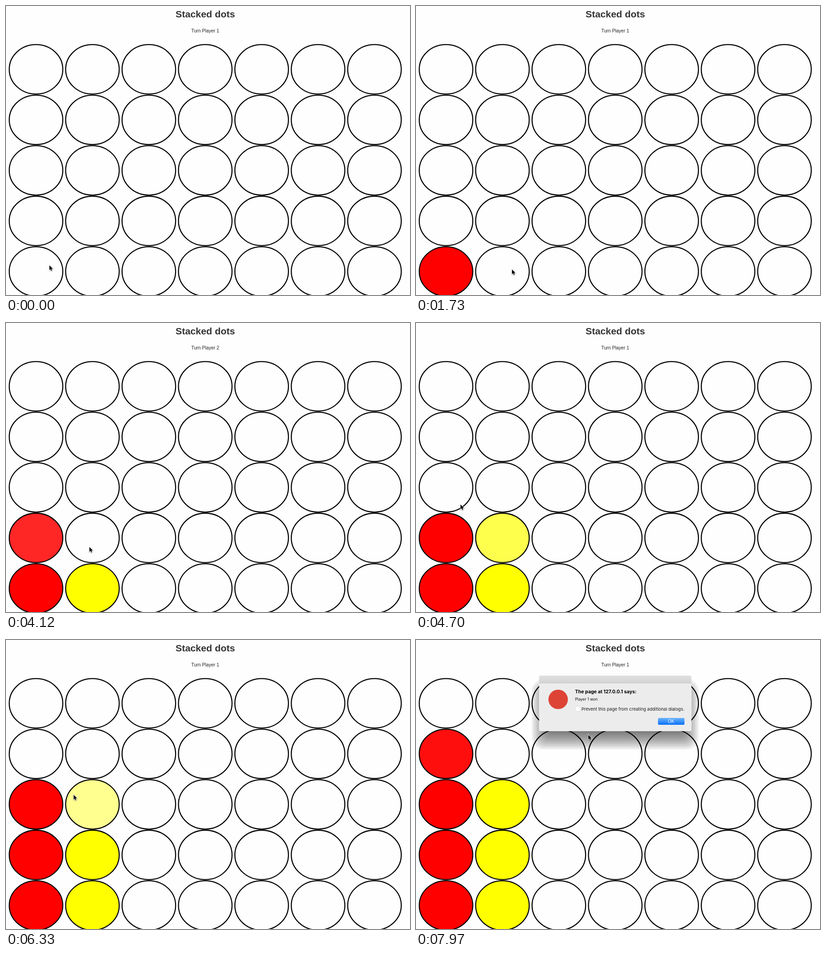
These frames come from a looping animation (884 by 634 pixels, 8000 ms). An HTML page with a canvas:

```html
<!DOCTYPE html>
<html lang="en">
<head>
<meta charset="utf-8">
<title>Stacked dots</title>
<style>
html, body { margin: 0; width: 100%; height: 100%; overflow: hidden; background: #fefefe; }
canvas { display: block; }
</style>
</head>
<body>
<canvas id="stage" width="884" height="634"></canvas>
<script>
const ctx = document.getElementById('stage').getContext('2d');
const SANS = '"Liberation Sans", Arial, sans-serif';
const UI = 'Inter, "Liberation Sans", sans-serif';
const LOOP = 8000;
const REFRESH = 148.6, PHASE = 1720;          // the screen updates in steps
const REST = 140, TRAVEL = 460;               // pointer pause after a stop, then move
const FADE = 1000, FADE_DELAY = 45;

// Where the pointer stops, and when it acts there
const stops = [
  { t: 300, x: 95, y: 569 },
  { t: 1720, x: 210, y: 578 },
  { t: 2470, x: 304.5, y: 583.5, idle: true },
  { t: 3500, x: 90, y: 504 },
  { t: 4240, x: 182.5, y: 491.5 },
  { t: 5280, x: 70, y: 368 },
  { t: 6020, x: 186, y: 380 },
  { t: 7210, x: 58.5, y: 245 },
  { t: LOOP, x: 377, y: 208, idle: true }
];
const clicks = stops.filter(s => !s.idle);
const won = clicks[clicks.length - 1].t;

const clamp = v => Math.max(0, Math.min(1, v));
const mix = (a, b, u) => a + (b - a) * u;
const smooth = u => u * u * (3 - 2 * u);

// CSS "ease": cubic-bezier(.25, .1, .25, 1)
function ease(x) {
  const bez = (s, a, b) => 3 * (1 - s) ** 2 * s * a + 3 * (1 - s) * s * s * b + s ** 3;
  let lo = 0, hi = 1;
  for (let i = 0; i < 24; i++) {
    const mid = (lo + hi) / 2;
    if (bez(mid, .25, .25) < x) lo = mid; else hi = mid;
  }
  return bez(lo, .1, 1);
}

const snap = t => Math.max(0, PHASE + Math.floor((t - PHASE) / REFRESH) * REFRESH);

function pointerAt(t) {
  const i = Math.max(0, stops.filter(s => s.t <= t).length - 1);
  const from = stops[i], to = stops[Math.min(i + 1, stops.length - 1)];
  const u = smooth(clamp((t - from.t - REST) / TRAVEL));
  return [mix(from.x, to.x, u), mix(from.y, to.y, u)];
}

function text(str, x, y, font, color, align = 'left') {
  ctx.font = font;
  ctx.fillStyle = color;
  ctx.textAlign = align;
  ctx.fillText(str, x, y);
}

function gradient(y0, y1, a, b) {
  const g = ctx.createLinearGradient(0, y0, 0, y1);
  g.addColorStop(0, a);
  g.addColorStop(1, b);
  return g;
}

function box(x, y, w, h, r, fill) {
  ctx.beginPath();
  ctx.roundRect(x, y, w, h, r);
  ctx.fillStyle = fill;
  ctx.fill();
}

function cell(col, row) {
  ctx.beginPath();
  ctx.ellipse(65.7 + col * 123.43, 138.9 + row * 110.85, 58.6, 54.2, 0, 0, Math.PI * 2);
}

function board(t) {
  // Red stacks the first column, yellow the second
  clicks.forEach((click, i) => {
    const col = i % 2, row = 4 - Math.floor(i / 2);
    const p = ease(clamp((t - click.t - FADE_DELAY) / FADE));
    cell(col, row);
    ctx.fillStyle = `rgba(255,${col * 255},0,${p})`;
    ctx.fill();
  });
  ctx.strokeStyle = '#000';
  ctx.lineWidth = 2.3;
  for (let row = 0; row < 5; row++) {
    for (let col = 0; col < 7; col++) {
      cell(col, row);
      ctx.stroke();
    }
  }
}

// Banded shadow, drawn only outside the window
function shadow(x, y, w, h) {
  ctx.save();
  ctx.beginPath();
  ctx.rect(-500, -500, 2000, 2000);
  ctx.roundRect(x, y, w, h, 4);
  ctx.clip('evenodd');
  for (let inset = 0; inset < 40; inset += 4) {
    const grow = 16 - inset;
    box(x - grow, y + 24 - grow, w + 2 * grow, h + 2 * grow, Math.max(6, 26 - inset / 2), 'rgba(0,0,0,.065)');
  }
  ctx.restore();
}

function dialog(t) {
  if (t < won) return;
  const p = clamp((t - won) / REFRESH);
  const scale = mix(.415, 1, p);
  const x = 269.5, y = 78, w = 333, h = 122;
  ctx.save();
  ctx.globalAlpha = mix(.33, 1, p);
  ctx.translate(436, 139);
  ctx.scale(scale, scale);
  ctx.translate(-436, -139);

  shadow(x, y, w, h);
  box(x, y, w, h, [4, 4, 2, 2], '#ececec');
  box(x, y, w, 16.5, [4, 4, 0, 0], gradient(y, y + 16, '#e0e0e0', '#d4d4d4'));
  box(x, 94, w, .8, 0, '#bcbcbc');

  ctx.beginPath();
  ctx.arc(311, 130.3, 21.3, 0, Math.PI * 2);
  ctx.fillStyle = '#dd4436';
  ctx.fill();

  text('The page at 127.0.0.1 says:', 348, 117, `bold 10.4px ${UI}`, '#000');
  text('Player 1 won', 348, 133, `8.4px ${UI}`, '#111');
  box(348.6, 145.6, 10.8, 10.8, 2, '#c8c8c8');
  box(349, 146, 10, 10, 2, '#fff');
  text('Prevent this page from creating additional dialogs.', 362, 154.5, `9.5px ${UI}`, '#1c1c1c');
  box(529.5, 171, 58, 15, 2.5, gradient(171, 186, '#6bb4fb', '#0a71f8'));
  text('OK', 558, 182, `9.8px ${UI}`, '#fff', 'center');
  ctx.restore();
}

function pointer(x, y) {
  ctx.save();
  ctx.translate(x, y);
  ctx.scale(.9, .9);
  ctx.beginPath();
  ctx.moveTo(0, 0);
  ctx.lineTo(0, 11.6);
  ctx.lineTo(2.7, 9.2);
  ctx.lineTo(4.6, 13.4);
  ctx.lineTo(6.5, 12.6);
  ctx.lineTo(4.8, 8.4);
  ctx.lineTo(8.4, 8.2);
  ctx.closePath();
  ctx.shadowColor = 'rgba(0,0,0,.35)';
  ctx.shadowBlur = 2;
  ctx.shadowOffsetY = 1;
  ctx.strokeStyle = '#fff';
  ctx.lineWidth = 1.8;
  ctx.stroke();
  ctx.shadowColor = 'transparent';
  ctx.fillStyle = '#000';
  ctx.fill();
  ctx.restore();
}

function draw(t) {
  box(0, 0, 884, 634, 0, '#fefefe');
  const player = 1 + clicks.filter(c => c.t <= t).length % 2;
  // The last click ends the game, so the turn stays
  const turn = t < won ? player : 1;
  text('Stacked dots', 436, 25, `bold 20.9px ${SANS}`, '#333', 'center');
  text('Turn Player ' + turn, 436, 58, `10.2px ${SANS}`, '#222', 'center');
  board(t);
  dialog(t);
  pointer(...pointerAt(t));
}

const begun = performance.now();
function tick() {
  draw(snap((performance.now() - begun) % LOOP));
  requestAnimationFrame(tick);
}
tick();
</script>
</body>
</html>
```
